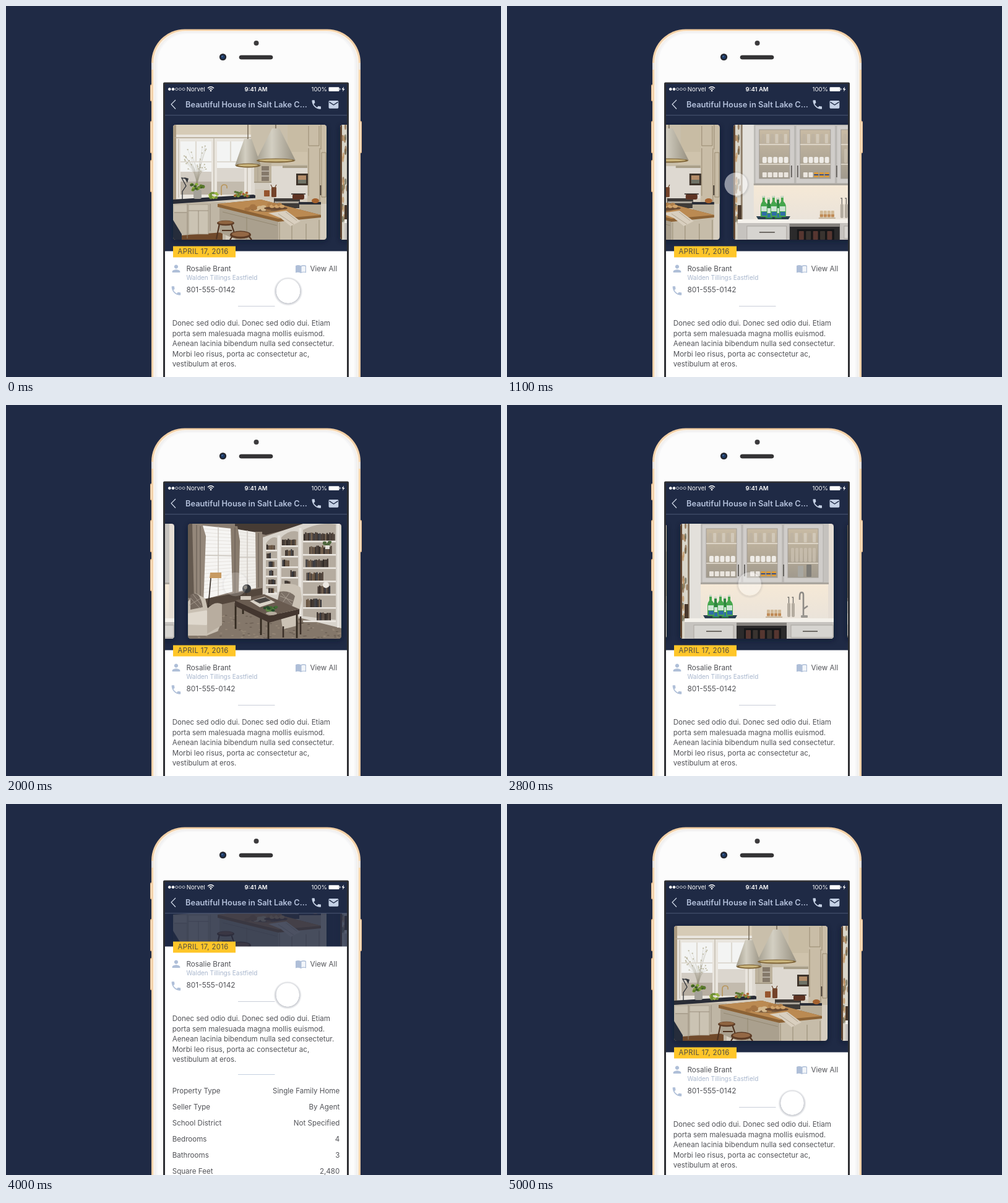
These frames come from a looping animation (800 px wide and 600 px high, 5100 ms). An HTML page:

```html
<!DOCTYPE html>
<html lang="en">
<head>
<meta charset="utf-8">
<title>House listing</title>
<style>
html,body{margin:0;width:100%;height:100%;overflow:hidden;background:#1f2a45}
svg{display:block;width:800px;height:600px;font-family:Inter,"Open Sans",sans-serif}
</style>
</head>
<body>
<svg id="stage" viewBox="0 0 800 600" xmlns="http://www.w3.org/2000/svg"></svg>
<script>
const R = (x, y, w, h, fill, rx = 0, more = '') => `<rect x="${x}" y="${y}" width="${w}" height="${h}" fill="${fill}" rx="${rx}" ${more}/>`;
const E = (x, y, rx, ry, fill, more = '') => `<ellipse cx="${x}" cy="${y}" rx="${rx}" ry="${ry}" fill="${fill}" ${more}/>`;
const P = (d, fill, more = '') => `<path d="M${d}z" fill="${fill}" ${more}/>`;
const L = (d, stroke, w = 1, more = '') => `<path d="M${d}" fill="none" stroke="${stroke}" stroke-width="${w}" ${more}/>`;
const T = (x, y, text, size, fill, more = '') => `<text x="${x}" y="${y}" font-size="${size}" fill="${fill}" ${more}>${text}</text>`;
const G = (body, more) => `<g ${more}>${body}</g>`;
const rep = (n, f) => Array.from({length: n}, (_, i) => f(i)).join('');
const seeded = s => () => (s = (s * 16807) % 2147483647) / 2147483647;

function kitchen() {
  const rnd = seeded(41);
  let s = R(270, 192, 248, 186, '#d5cdbf') + R(270, 192, 150, 22, '#d6cbb6') + R(270, 192, 5, 125, '#a8987f');
  // windows
  s += R(275, 208, 122, 104, '#e9e5de') + R(282, 219, 50, 86, '#f3f4f3') + R(341, 219, 44, 86, '#f3f4f3');
  s += R(282, 268, 50, 37, '#d3cdc4') + R(341, 262, 44, 43, '#dbd6ce') + R(282, 284, 50, 21, '#b7aea1') + R(341, 284, 44, 21, '#c3bbae');
  s += rep(30, i => {
    const x = 288 + rnd() * 36, y = 226 + rnd() * 42;
    return L(`308 292Q${308 + rnd() * 6} 268 ${x} ${y}`, i % 3 ? '#a69f8c' : '#7e7969', .4, 'opacity=".5"') + E(x, y, 1.2, 1, '#9c9470', 'opacity=".6"');
  });
  s += L('282 252h50M341 252h44M307 219v33M363 219v33', '#dedad2', 2.2) + L('336 214v92M279 215v95M390 214v92', '#bdb5a7', 1.2);
  s += L('272 213h124', '#b0a48e', 1.5);
  // right wall
  s += R(396, 192, 94, 70, '#c9bfab') + R(396, 259, 110, 52, '#ded9d1') + R(401, 254, 28, 31, '#bdb29d') + R(413, 259, 12, 24, '#85796a');
  s += L('413 267h12M413 275h12', '#e3dfd5', 1.2) + L('407 255v29', '#a99f8c');
  s += R(402, 285, 24, 22, '#d3cdc2') + R(401, 284, 28, 2, '#a79c87');
  s += R(451, 236, 36, 20, '#cfc3ac') + P('447 258h42v4h-42', '#a99f89') + R(455, 192, 32, 44, '#c8bca4');
  s += R(487, 192, 31, 128, '#c9bda7') + L('489 194v32h17v-32M509 192v40M489 230v77M507 230v90M510 237h7v72h-7z', '#97896f');
  s += R(507.5, 290, 1.8, 16, '#443b33') + R(469, 271, 19, 19, '#3e342b') + R(472, 274, 13, 13, '#b48d69') + R(472, 281, 13, 6, '#6f7367');
  // base cabinets and worktops
  s += R(270, 317, 85, 61, '#bfb6a5') + P('270 372 350 366 350 378 270 378', '#714a2b') + P('270 313 400 305 412 310 300 318 270 320', '#292c36');
  s += R(272, 322, 21, 11, '#cbc3b3') + R(295, 321, 32, 48, '#cbc3b3', 0, 'stroke="#9a8f7d" stroke-width=".7"') + L('293 320v56M311 331v38M295 331h32M330 320v44M272 334h20', '#948978', .9);
  s += P('270 346 284 369 284 378 270 378', '#252c3b') + R(403, 296, 32, 17, '#d0c8b9');
  s += R(433, 311, 42, 16, '#3f3b38') + R(434, 316, 40, 3, '#a9a49a') + R(473, 317, 36, 4, '#2b2e38') + R(474, 321, 35, 18, '#b8ad98');
  s += R(463, 304, 19, 9, '#5f3423', 3) + L('461 304h23', '#2d2420', 1.6) + E(500, 315, 6, 4, '#a5622f');
  s += R(417, 298, 9, 10, '#96552d', 1) + R(429, 293, 8, 16, '#74432a', 1) + L('431 295l-3-6M434 295l3-6', '#6f4b32', 1.3);
  // lamp, plants, tap
  s += L('285 313V300l6-9-7-13 7 1', '#2d3036', 1.3) + P('288 277l7 2-2 7z', '#33363b') + E(285, 314, 5, 1.6, '#2d3036');
  s += R(303, 297, 13, 15, '#a5a29a', 3) + rep(22, i => E(299 + rnd() * 22, 288 + rnd() * 10, 2.4, 2, ['#5d7c2b', '#86a93a', '#3f5f25'][i % 3]));
  s += L('348 306V294q0-5 5-5q5 0 4 6', '#b8955a', 1.6);
  s += rep(18, i => E(329 + rnd() * 13, 302 + rnd() * 9, 2.4, 1.8, i % 2 ? '#6f8f35' : '#9cb545')) + rep(20, i => E(370 + rnd() * 22, 300 + rnd() * 8, 2.3, 1.8, ['#567332', '#7d953f', '#a8612f'][i % 3]));
  // island
  s += P('345 325 441 349 441 378 372 378 345 366', '#aaa08e') + P('440 348 508 342 508 378 440 378', '#c6bca9');
  s += L('389 341v37M442 350v28M462 354v24M485 352v26M506 346v32M350 333l88 22', '#948972', 1) + P('342 320 412 313 509 338 509 342 440 349 342 325', '#8c6235') + P('342 320 412 313 509 338 440 344', '#bb8a52');
  s += P('424 335 453 331 476 348 460 356 444 343', '#d9cfbf') + L('440 336l25 17M452 333l18 14', '#a89b86', .8);
  s += E(420, 329, 24, 3.4, '#7d5e3f') + rep(12, i => E(388 + rnd() * 44, 323 + rnd() * 6, 4.5, 2.8, i % 2 ? '#a57443' : '#d3b88e')) + E(436, 327, 19, 3, '#6b4a30') + rep(6, i => E(426 + i * 4, 321 + i % 2 * 3, 4, 2.8, i % 2 ? '#d0a46c' : '#b07f4a'));
  // stools
  s += L('345 352l-5 25M364 352l6 18M349 363h16M366 372l-4 6M393 373l4 5', '#4f3320', 2.2) + E(355, 351, 14, 4.3, '#5d3c26') + E(355, 350, 12, 2.8, '#8f6440') + E(379, 370, 17, 6.5, '#5d3c26') + E(379, 369, 14, 4, '#946845');
  // pendants
  const pendant = (x, y, h, w) => L(`${x} 192v${y - 190}`, '#6d6250', 1.4) + P(`${x - 6} ${y}h12l${w - 6} ${h}Q${x} ${y + h + 7} ${x - w} ${y + h}`, 'url(#shade)') + E(x, y + h, w - 1, 3.6, '#80663a') + E(x, y + h - .4, w - 5, 1.9, '#cbb67e');
  return s + pendant(391, 215, 43, 21) + pendant(436, 198, 52, 32);
}

function cabinet() {
  const rnd = seeded(77);
  let s = R(280, 192, 248, 186, '#e6ded5') + R(280, 192, 15, 186, '#d9d5c9') + R(280, 192, 3, 186, '#5d422e') + R(292, 192, 3, 186, '#8d7c68');
  s += rep(24, i => E(284 + rnd() * 7, 194 + rnd() * 152, 1.6, 5, ['#8b6a48', '#c49764', '#6b6a55'][i % 3], 'opacity=".75"')) + R(287, 322, 6, 31, '#49382b') + R(295, 192, 19, 155, '#e3e0db');
  s += R(313, 287, 206, 60, 'url(#glow)') + R(313, 192, 207, 98, '#c5c2be') + R(313, 287, 207, 3, '#aaa59d');
  [322, 388, 454].forEach((x, k) => {
    s += R(x - 7, 193, 64, 94, '#d0cdca', 0, 'stroke="#aaa7a3" stroke-width=".8"') + R(x, 200, 49, 79, 'url(#glass)', 0, 'stroke="#a19c94"');
    s += rep(6, i => R(x + 4 + i * 7.2, 207, 5, 15, i % 2 ? '#ddd6ca' : '#bdb3a4', 1, 'opacity=".6"')) + L(`${x} 224h49M${x} 256h49`, '#e6dfd3', 1.4);
    if (k < 2) s += rep(5, i => R(x + 5 + i * 8.7, 244, 7, 10, '#eeebe6', 2) + R(x + 5 + i * 8.7, 269, 7, 8, k && i > 1 ? '#dc9b38' : '#eae5de', 1) + (k && i > 1 ? R(x + 5 + i * 8.7, 272, 7, 2, '#374f87') : ''));
    else s += rep(6, i => R(x + 5 + i * 7, 231, 5, 23, '#cdc3b4', 2, 'opacity=".7"')) + R(470, 260, 9, 18, '#a8a7a1', 1) + R(484, 258, 8, 20, '#7d7b76', 1);
  });
  s += L('374 258v19M384 258v19M447 258v19', '#5f5c58', 1.8);
  // worktop and drawers
  s += R(287, 345, 241, 6, '#f4f1eb') + R(287, 351, 241, 27, '#c6c3bf') + R(302, 356, 64, 22, '#d6d4d0', 0, 'stroke="#aaa6a0"') + R(459, 356, 68, 20, '#d6d4d0', 0, 'stroke="#aaa6a0"');
  s += L('322 366h25M478 366h24', '#6f6b66', 2) + R(371, 352, 81, 26, '#2b2a2b') + R(371, 352, 81, 5, '#85827e') + R(383, 361, 60, 17, '#161719') + rep(5, i => R(386 + i * 11.4, 364, 8, 14, i % 2 ? '#39332f' : '#563630', 1));
  // bottles and tray
  s += P('317 340h55l-3 5h-49', '#2b4050') + rep(5, i => {
    const x = [332, 347, 340, 324, 354][i], y = i < 2 ? 310 : 307;
    return P(`${x + 3} ${y}h4v9q4 4 4 8v17h-11v-17q0-4 3-8`, i < 2 ? '#2f8740' : '#45a64d') + R(x + 1, y + 17, 9, 8, '#cfe5d5') + R(x + 2, y + 26, 8, 6, '#2f6da8') + R(x + 3, y, 4, 3, '#c9d9c7');
  });
  s += rep(4, i => R(420 + i * 6, 331, 5, 11, '#d2b996', 1) + R(420 + i * 6, 337, 5, 4, '#bf8a56')) + R(418, 342, 27, 2, '#c6b59d');
  s += rep(2, i => R(453 + i * 7, 320, 5, 23, '#b4aca0', 2) + L(`${455.5 + i * 7} 320v-9h-2`, '#6f6d69', 1.3));
  return s + L('479 343V307q0-4-3-4q-3 0-3 8v4M479 330l7-5', '#8e8b86', 2.6) + R(475, 340, 11, 4, '#9b9892', 1);
}

function office() {
  const rnd = seeded(19);
  let s = R(294, 192, 248, 186, '#8b7e72') + P('370 192h120l-70 18-50-10', '#463b34') + R(294, 192, 20, 120, '#64594f') + P('294 336 400 300 542 352 542 378 294 378', '#84776a');
  s += rep(160, i => E(296 + rnd() * 244, 338 + rnd() * 40, 2.2, .8, i % 2 ? '#a39583' : '#5d5147', 'opacity=".6"'));
  // blinds and curtains
  s += P('318 195 366 200 366 302 318 315', '#f6f5f3') + P('374 201 405 206 405 296 374 302', '#f0eeea');
  s += rep(18, i => L(`318 ${200 + i * 6.1}L366 ${204 + i * 5.4}M374 ${205 + i * 5.3}L405 ${209 + i * 4.8}`, '#dad6cf', .6)) + L('343 197v111M390 203v95M318 243l48 1M374 246h31', '#cbc6be', 1.4);
  s += P('301 192h16l6 20-4 110h-15', '#94877a') + P('363 196h11l4 24-2 86h-10', '#887b6d') + P('403 205h11v92h-10', '#94877a') + L('308 194v126M314 196v122M370 198v106M408 207v88', '#6b6056', 1.2);
  s += P('314 315 414 296 414 308 314 330', '#54473d');
  // bookcase
  s += P('415 214 480 192 542 192 542 361 478 345 415 307', '#d9d4cc');
  const books = ['#2c2521', '#3b302a', '#4e4037', '#33343a', '#66523f'];
  const shelf = (x, w, y, rows, h) => P(`${x} ${y + 7}q${w / 2} -13 ${w} -9v${rows * h + 4}l${-w} -6`, '#b5aca0') + rep(rows, r => {
    const b = y + (r + 1) * h, full = r ? .4 + rnd() * .4 : 1, from = x + 1 + rnd() * w * (1 - full);
    return rep(Math.floor(w * full / 2.3) - 1, i => {
      const tall = h * (.5 + rnd() * .15);
      return R(from + i * 2.3, b + 3 - tall, 2.1, tall, books[Math.floor(rnd() * 5)]);
    }) + R(x, b + 3, w, 2.6, '#ebe7e1');
  });
  s += shelf(420, 18, 217, 6, 14) + shelf(445, 27, 207, 7, 17) + shelf(480, 53, 195, 7, 21.5) + L('441 211v91M475.500 199v146M537 192v168', '#e9e5df', 4);
  s += rep(9, () => E(514 + rnd() * 10, 220 + rnd() * 8, 3, 1.7, '#4e663d')) + R(516, 227, 7, 6, '#e6e3dd') + E(517, 291, 5, 5, '#ece8e1');
  // lamp and globe
  s += L('331 279l-4 46', '#3c332d', 1.7) + P('330 271h18v9h-19', '#c79a62') + E(327, 326, 7, 2, '#40362e');
  // armchairs
  s += P('294 318 306 304 322 313 326 330 348 322 349 350 342 366 324 373 294 373', '#c9c0b3') + P('298 307q15-9 20 20l-20 4', '#75695f') + P('294 337 324 332 333 344 324 356 294 355', '#dfd8cd') + P('325 330q12-14 24-8v34l-24 14', '#b8ad9f') + L('298 312l16 17M302 306l13 17M296 324l18-11', '#aea296', .8);
  s += P('440 311 444 290q18-4 32 5l2 20-8 42-23 6', '#cbc2b5') + P('442 302q15-3 25 7l-5 17-24-6', '#7c7066') + L('443 309l21 8M445 304l17 18M458 304l-12 17', '#b5aa9e', .8) + L('448 358v18M476 342v29', '#3a2e27', 2.5);
  // desk
  s += L('371 320v42M383 326v12M424 349v29M470 336v41M412 342v30', '#32291f', 2.8) + P('370 316 425 341 474 330 474 338 425 352 370 325', '#43362f') + P('370 316 417 306 474 330 425 341', '#695b50');
  s += R(379, 309, 17, 6, '#d4cbbf') + L('388 308v-9', '#4a3b30', 2) + E(389, 297, 7, 7, '#37383a') + E(387, 295, 3, 3, '#777168') + P('394 317 418 310 435 319 410 327', '#d9d2c7') + P('400 316 419 311 428 316 410 321', '#4a4643');
  return s + rep(18, i => E(418 + rnd() * 20, 326 + rnd() * 8, 3, 2, ['#436c35', '#5d8543', '#284c2c'][i % 3])) + E(429, 337, 9, 3, '#b5ab9e');
}

const NAVY = '#1f2a45', INK = '#525358', PALE = '#afbfd8';
const CALL = '6.62 10.79c1.44 2.83 3.76 5.14 6.59 6.59l2.2-2.2c.27-.27.67-.36 1.02-.24 1.12.37 2.33.57 3.57.57.55 0 1 .45 1 1V20c0 .55-.45 1-1 1-9.39 0-17-7.61-17-17 0-.55.45-1 1-1h3.5c.55 0 1 .45 1 1 0 1.25.2 2.45.57 3.57.11.35.03.74-.25 1.02l-2.2 2.2';

const grad = (id, type, stops, more = '') => `<${type}Gradient id="${id}" ${more}>${stops.map(([o, c, a = 1]) => `<stop offset="${o}" stop-color="${c}" stop-opacity="${a}"/>`).join('')}</${type}Gradient>`;
const cards = [[270, 0, kitchen], [280, 260, cabinet], [294, 516, office]];

const defs = '<defs>' +
  grad('shade', 'linear', [[0, '#a39d8d'], [.4, '#d3cfc2'], [1, '#979080']]) +
  grad('glow', 'linear', [[0, '#f6e9d6'], [1, '#eae3da']], 'x2="0" y2="1"') +
  grad('glass', 'linear', [[0, '#c9bba4'], [1, '#a19a8d']], 'x2="0" y2="1"') +
  grad('gold', 'linear', [[0, '#f3d2aa'], [.5, '#efc594'], [1, '#f3d2aa']]) +
  grad('ring', 'radial', [[0, '#16203a', 0], [.8, '#16203a', 0], [.82, '#16203a', .24], [1, '#16203a', 0]]) +
  '<filter id="soft" x="-20%" y="-20%" width="140%" height="140%"><feGaussianBlur stdDeviation="4"/></filter>' +
  '<clipPath id="view"><rect x="257" y="177" width="294" height="423"/></clipPath>' +
  cards.map(([x], i) => `<clipPath id="c${i}"><rect x="${x}" y="192" width="248" height="186" rx="4.5"/></clipPath>`).join('') + '</defs>';

function phone() {
  const side = (x, y, h) => R(x, y, 3, h, '#e3b98c', 1.5) + R(x + 1, y + 2, 1, h - 4, '#fbe6cc');
  return R(0, 0, 800, 600, NAVY) + side(233, 127, 27) + side(233, 186, 52) + side(233, 249, 52) + side(572, 186, 52) +
    R(235, 37.5, 338, 700, 'url(#gold)', 54) + R(235, 92, 338, 11, '#e4e0dc') +
    R(238, 40, 332, 700, '#fbf3e8', 52) + R(240, 41.5, 328, 700, '#f0f0f1', 51) + R(242.5, 43, 323, 700, '#f6f6f7', 49) + R(245, 45, 318, 700, '#fcfcfc', 47) +
    E(404.5, 60, 4, 4, '#3c3b3d') + R(377, 80, 54, 6, '#353436', 3, 'stroke="#1f1f21" stroke-width=".7"') +
    E(350.5, 82.5, 5.6, 5.6, '#23252d') + E(350.5, 82.5, 3.2, 3.2, '#1d3a66') + E(349.5, 81.5, 1.1, 1.1, '#5179ae') +
    R(254, 123.5, 300, 500, '#2d2e32', 2) + R(257, 126, 294, 480, NAVY);
}

function details() {
  const rows = [['Property Type', 'Single Family Home'], ['Seller Type', 'By Agent'], ['School District', 'Not Specified'], ['Bedrooms', '4'], ['Bathrooms', '3'], ['Square Feet', '2,480'], ['Year Built', '1998']];
  const copy = ['Donec sed odio dui. Donec sed odio dui. Etiam', 'porta sem malesuada magna mollis euismod.', 'Aenean lacinia bibendum nulla sed consectetur.', 'Morbi leo risus, porta ac consectetur ac,', 'vestibulum at eros.'];
  return R(257, 396.5, 294, 700, '#fff') + R(270, 388.5, 101, 18, '#ffc629') +
    T(277.5, 401.3, 'APRIL 17, 2016', 11.3, '#4d4b45', 'letter-spacing=".4"') +
    P('12 12c2.21 0 4-1.79 4-4s-1.79-4-4-4-4 1.79-4 4 1.79 4 4 4zm0 2c-2.67 0-8 1.34-8 4v2h16v-2c0-2.66-5.33-4-8-4', PALE, 'transform="translate(265.5 415.3) scale(.79)"') +
    T(291.5, 429.4, 'Rosalie Brant', 11.7, INK) + T(291.5, 443, 'Walden Tillings Eastfield', 10, '#a8b6cd') +
    P(CALL, PALE, 'transform="translate(265.2 450.8) scale(.81)"') + T(291.5, 463.4, '801-555-0142', 11.9, INK) +
    P('468 420q4-2 8.5 0q4.500-2 8.500 0v11.500q-4-1.500-8.500.5q-4.500-2-8.500-.5', PALE) + P('477.500 421.200q3-1.200 6.300-.2v9q-3.300-.8-6.300.2', '#f3f6fa') +
    T(491.5, 429.4, 'View All', 11.6, INK) + L('375 485.5h59.500', '#c9ced8') +
    copy.map((s, i) => T(268.7, 517.4 + i * 16.5, s, 11.6, INK)).join('') + L('375 603.5h59.500', '#c4d0e0') +
    rows.map(([a, b], i) => T(268.7, 634.3 + i * 26, a, 11.6, INK) + T(539.3, 634.3 + i * 26, b, 11.6, INK, 'text-anchor="end"')).join('');
}

function header() {
  return R(257, 126, 294, 51, NAVY) + L('257 176.7h294', '#4a5773') +
    rep(5, i => E(264.3 + i * 5.7, 134.5, 2, 2, i < 2 ? '#fff' : 'none', 'stroke="#fff" stroke-width=".7"')) +
    T(291.7, 138, 'Norvel', 9.6, '#fff') +
    L('326 133q5-4.500 10 0M328 135q3-2.600 6 0', '#fff', 1.4) + E(331, 137, 1.3, 1.3, '#fff') +
    T(404, 138, '9:41 AM', 9.5, '#fff', 'text-anchor="middle" font-weight="600"') +
    T(519, 138, '100%', 9.6, '#fff', 'text-anchor="end"') + R(521.5, 131.2, 17, 6.8, '#fff', 1.2) + R(539.2, 133.2, 1.2, 2.6, '#fff') + P('546 130.500l-3.500 4.500h2.200l-.7 3.500 3.500-4.500h-2.200', '#fff') +
    L('274 152l-7 7 7 7.500', '#dbe3f1', 1.1) +
    T(290, 164, 'Beautiful House in Salt Lake C...', 12.8, '#b4c1dc', 'font-weight="600"') +
    P(CALL, '#c6d2e6', 'transform="translate(492 149.800) scale(.81)"') +
    R(521.5, 153, 15.8, 12.7, '#c6d2e6', 1.6) + L('522.500 155.300l7 4.700 7-4.700', NAVY, 1.4);
}

const stage = document.getElementById('stage');
stage.innerHTML = defs + phone() +
  G(G(cards.map(([x, shift, draw], i) => G(
    R(x, 194, 248, 186, '#0b1228', 5, 'filter="url(#soft)" opacity=".65"') + G(draw(), `clip-path="url(#c${i})"`),
    `transform="translate(${shift} 0)"`)).join(''), 'id="reel"') +
  R(257, 177, 294, 240, NAVY, 0, 'id="dim"') + G(details(), 'id="sheet"'), 'clip-path="url(#view)"') +
  header() + G(E(0, 1.2, 22.8, 22.8, 'url(#ring)') + E(0, 0, 18.6, 18.6, '#fff'), 'id="touch"');

const [reel, dim, sheet, touch] = ['reel', 'dim', 'sheet', 'touch'].map(id => document.getElementById(id));

// keys alternate time and value, eased in between
function track(t, ...keys) {
  let i = 0;
  while (i < keys.length - 2 && t >= keys[i + 2]) i += 2;
  if (i >= keys.length - 2) return keys[i + 1];
  const u = Math.max(0, (t - keys[i]) / (keys[i + 2] - keys[i]));
  return keys[i + 1] + (keys[i + 3] - keys[i + 1]) * u * u * (3 - 2 * u);
}

function render(t) {
  const slide = track(t, 700, 0, 1350, -260, 1600, -260, 2036, -521, 2250, -521, 2750, -260, 2900, -260, 3400, 0);
  const scroll = track(t, 3650, 0, 4100, -190, 4250, -190, 4807, 5, 5000, 5, 5100, 0);
  const x = track(t, 0, 456, 500, 485, 700, 485, 1150, 366, 1350, 366, 1600, 485, 1950, 371, 2100, 371, 2300, 345, 2600, 455, 2850, 385, 2950, 385, 3250, 460, 3600, 456, 4500, 454, 5000, 461, 5100, 456);
  const y = track(t, -135, 483, 500, 288, 1100, 288, 2000, 290, 2800, 289, 3200, 289, 3600, 474, 3650, 474, 4100, 284, 4250, 284, 4780, 484, 5000, 483, 5100, 460);
  const alpha = track(t, 0, 1, 500, .55, 1100, .5, 1700, .5, 2000, .2, 2300, .45, 2800, .38, 3200, .5, 3600, 1);
  const size = track(t, 0, 1.03, 700, 1, 1800, 1, 2000, 1.03, 2300, 1, 5000, 1, 5100, 1.03);
  reel.setAttribute('transform', `translate(${slide} ${scroll < 0 ? scroll * .85 : scroll})`);
  sheet.setAttribute('transform', `translate(0 ${scroll})`);
  dim.setAttribute('opacity', Math.max(0, -scroll / 219));
  touch.setAttribute('transform', `translate(${x} ${y}) scale(${size})`);
  touch.setAttribute('opacity', alpha);
}

const LOOP = 5100, STEP = 100, start = performance.now();
function tick() {
  const t = (performance.now() - start) % LOOP;
  render(Math.floor(t / STEP) * STEP);
  requestAnimationFrame(tick);
}
render(0);
requestAnimationFrame(tick);
</script>
</body>
</html>
```
